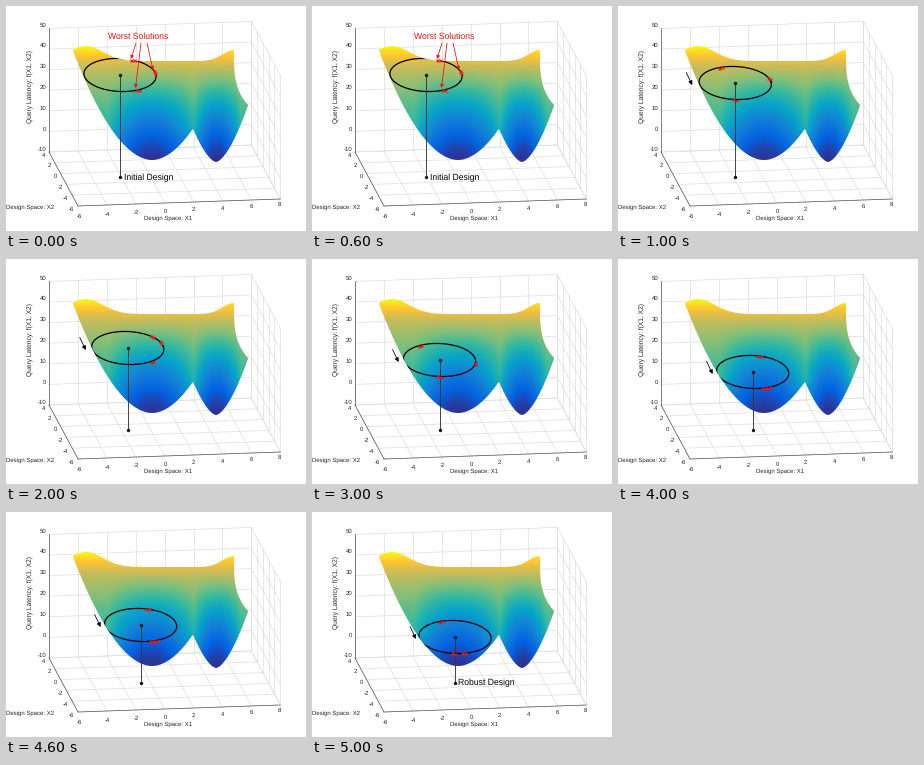
A matplotlib script that plays this animation: 300x225 px, repeating every 6 s.

```python
import numpy as np
import matplotlib.pyplot as plt
from matplotlib.animation import FuncAnimation
from matplotlib.colors import LinearSegmentedColormap
from matplotlib.patches import Polygon

W, H, DPI = 300, 225, 100
PX = 72 / DPI
STEPS = 6
plt.rcParams["font.family"] = "Liberation Sans"
plt.rcParams["text.hinting"] = "none"
INK, RED = "#262626", "#f01010"

fig = plt.figure(figsize=(W / DPI, H / DPI), dpi=DPI, facecolor="white")
ax = fig.add_axes([0, 0, 1, 1])
ax.axis("off")

parula = LinearSegmentedColormap.from_list("parula", [
    (.208, .166, .529), (.012, .388, .882), (.078, .504, .838),
    (.024, .641, .792), (.196, .722, .631), (.512, .749, .473),
    (.779, .736, .359), (.994, .766, .203), (.976, .983, .054)])


def project(x, y, z):
    return (72 + 14.45 * (x + 6) - 2.9 * (y + 6),
            200 - .5 * (x + 6) - 5.4 * (y + 6) - 2.06 * (z + 10))


def segment(a, b, **style):
    (x0, y0), (x1, y1) = project(*a), project(*b)
    ax.plot([x0, x1], [y0, y1], **style)


def label(x, y, s, size=6, **kw):
    kw = {"ha": "center", "va": "center", "color": INK, **kw}
    return ax.text(x, y, s, fontsize=size * PX, zorder=8, **kw)


def note(x, y, s, color="black"):
    return label(x, y, s, 8.7, ha="left", color=color)


def arrow(start, tip, color, head=5):
    props = dict(arrowstyle="-|>", color=color, lw=.8 * PX,
                 mutation_scale=head, shrinkA=0, shrinkB=0)
    return ax.annotate("", xy=tip, xytext=start, arrowprops=props, zorder=8)


def draw_axes():
    grid = dict(color="#dedede", lw=.7 * PX, zorder=1)
    for x in range(-6, 9, 2):
        segment((x, 4, -10), (x, 4, 50), **grid)
        segment((x, -6, -10), (x, 4, -10), **grid)
    for y in range(-6, 5, 2):
        segment((8, y, -10), (8, y, 50), **grid)
        segment((-6, y, -10), (8, y, -10), **grid)
    for z in range(-10, 51, 10):
        segment((-6, 4, z), (8, 4, z), **grid)
        segment((8, -6, z), (8, 4, z), **grid)

    edge = dict(color="#555555", lw=.7 * PX, zorder=2)
    segment((-6, 4, -10), (-6, 4, 50), **edge)
    segment((-6, -6, -10), (-6, 4, -10), **edge)
    segment((-6, -6, -10), (8, -6, -10), **edge)

    for i, x in enumerate(range(-6, 9, 2)):
        label(73 + 28.7 * i, 210 - 1.6 * i, x)
    for i, y in enumerate(range(4, -7, -2)):
        label(39.5 + 5.7 * i, 149 + 10.8 * i, y, ha="right")
    for i, z in enumerate(range(50, -11, -10)):
        label(40.5, 19 + 20.8 * i, z, ha="right")
    label(162, 212.5, "Design Space: X1")
    label(0, 201, "Design Space: X2", ha="left")
    label(24, 81, "Query Latency: f(X1, X2)", 6.6, rotation=90)


def bump(x, center, width):
    return np.exp(-((x - center) / width) ** 2)


def top_edge(x):
    return 55 - 15 * bump(x, 80, 24) - 11 * bump(x, 228, 16)


def bottom_edge(x):
    # two bowls meeting in a ridge
    return np.maximum(154 - .0271 * abs(x - 146) ** 1.9,
                      156 - .22 * abs(x - 210) ** 1.6)


def silhouette():
    along = np.linspace(67, 228, 120)
    down = np.linspace(44, 99, 40)
    back = np.linspace(242, 67, 200)
    side = 228 + 14 * ((down - 44) / 55) ** 3.5
    return np.column_stack([np.r_[along, side, back],
                            np.r_[top_edge(along), down, bottom_edge(back)]])


def level(x, y):
    fall = np.clip(1 - (y - 53) / 100, 0, None)
    cup = .25 * np.minimum(((x - 146) / 40) ** 2, ((x - 211) / 22) ** 2)
    depth = np.clip((y - 60) / 60, 0, 1)
    return .02 + .82 * fall ** 1.4 + np.minimum(cup, .3) * depth


def draw_surface():
    gx, gy = np.meshgrid(np.arange(64.5, 246), np.arange(36.5, 160))
    clip = Polygon(silhouette(), closed=True, transform=ax.transData)
    img = ax.imshow(level(gx, gy), cmap=parula, vmin=0, vmax=1,
                    extent=(64, 246, 160, 36), aspect="auto",
                    interpolation="bilinear", zorder=3)
    img.set_clip_path(clip)
    return clip


def center(i):
    return 114 + 2.6 * i + .64 * i * i, max(69, 65 + 12 * i)


def ring_point(i, t):
    cx, cy = center(i)
    return (cx + 35.6 * np.cos(t) + 6 * np.sin(t),
            cy - 1.4 * np.cos(t) + 16.5 * np.sin(t))


def descent_arrow(i):
    cx, cy = center(i)
    x, y = cx - 44 + i, cy + 2
    return arrow((x - 6, y - 12.5), (x, y), "black", 6)


# Directions of the worst neighbours on the ring, in degrees
WORST = [(-60, -6, 71), (-104, -11, 101), (-38, -16, 58),
         (-113, 18, 101), (-69, 82, 73), (-104, 102, 86)]

draw_axes()
clip = draw_surface()
ax.set_xlim(0, W)
ax.set_ylim(H, 0)

stem, = ax.plot([], [], color="#333333", lw=.9 * PX, zorder=5)
dots, = ax.plot([], [], "o", color="#151515", ms=3.4 * PX, mew=0, zorder=6)
ring, = ax.plot([], [], color="black", lw=1.25 * PX, zorder=6)
ring.set_clip_path(clip)
worst, = ax.plot([], [], "x", color=RED, ms=3 * PX, mew=PX, zorder=7)

extras = [[descent_arrow(i)] if i else [] for i in range(STEPS)]
extras[0] += [note(102, 31, "Worst Solutions", RED),
              note(117.5, 172, "Initial Design")]
extras[0] += [arrow((x, 37), tip, RED) for x, tip in
              [(130, (125, 53)), (135, (129.5, 82)), (141, (147, 64))]]
extras[-1].append(note(146.5, 171, "Robust Design"))


def update(i):
    cx, cy = center(i)
    stem.set_data([cx, cx], [cy, 170.5])
    dots.set_data([cx, cx], [cy, 170.5])
    ring.set_data(*ring_point(i, np.linspace(0, 2 * np.pi, 160)))
    marks = np.radians([a + d for a in WORST[i] for d in (-2.5, 2.5)])
    worst.set_data(*ring_point(i, marks))
    for k, group in enumerate(extras):
        for artist in group:
            artist.set_visible(k == i)
    return [stem, dots, ring, worst]


anim = FuncAnimation(fig, update, frames=STEPS, interval=1000, repeat=True,
                     repeat_delay=0, blit=False)
plt.show()
```
